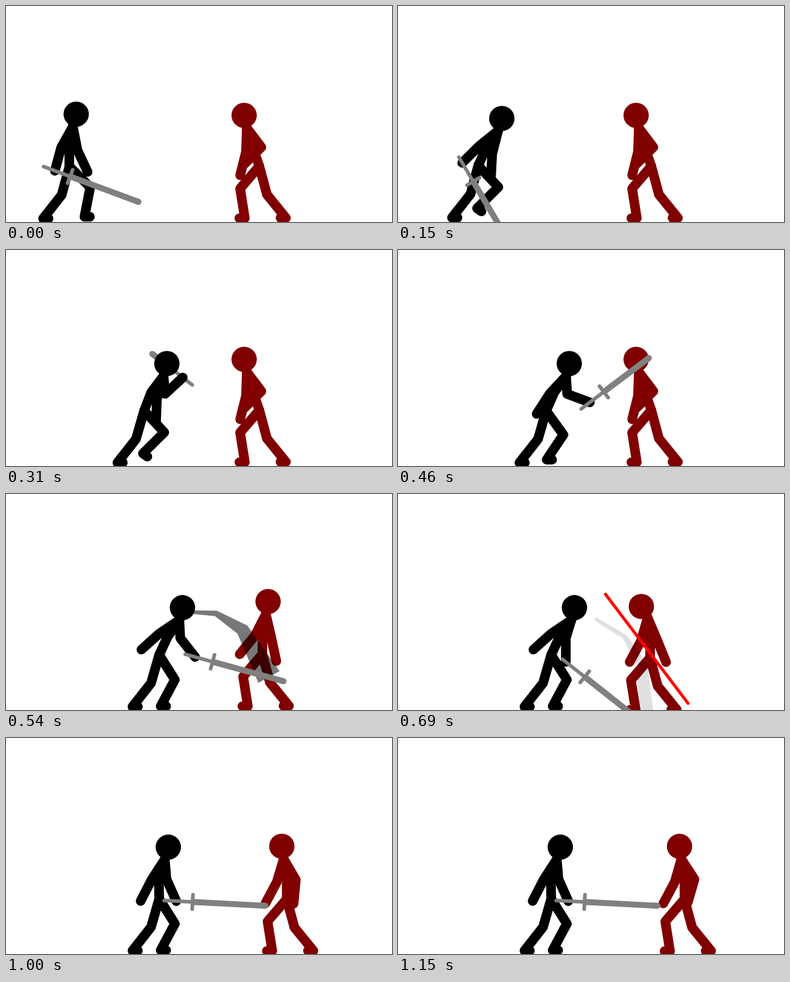
An HTML page with a canvas that plays this animation: 640x360 px, repeating every 1.22 s.

```html
<!DOCTYPE html>
<html lang="en">
<head>
<meta charset="utf-8">
<title>Sword fight</title>
<style>
  html, body { margin: 0; width: 100%; height: 100%; overflow: hidden; background: #fff; }
  canvas { display: block; width: 640px; height: 360px; }
</style>
</head>
<body>
<canvas id="stage" width="640" height="360"></canvas>
<script>
const ctx = document.getElementById('stage').getContext('2d');
const LOOP = 1220, FPS = 13, STEPS = 16;
const SPINE = 33.5, NECK = 21.5, HEAD = 21, ARM = 40, THIGH = 49, SHIN = 50, FOOT = 9, GRIP = 47;
const GREY = '#808080';

// Limbs hang: 0 degrees is down, positive swings right.
// spine: waist, chest and head lean; sword: angle, grip offset, length; reach: sword upper arm
const swordsman = {
  walk: { hip: [105, 267.5], spine: [0, 10, 15], armA: [-29, -15], armB: [11, 25],
    legA: [-15, -38], legB: [45, -11], reach: [40], sword: [20.5, 20, 168] },
  stoop: { hip: [133, 266], spine: [24, 35, 17], armA: [-51, -45], armB: [-14, -3],
    legA: [-15, -38], legB: [43, -45], reach: [40], sword: [59.5, 11, 168] },
  raise: { hip: [229, 268], spine: [21, 37, 15], armA: [5, 133], armB: [-16, -2],
    legA: [-16, -38], legB: [43, -45], reach: [30], sword: [-142, 20, 84] },
  strike: { hip: [254, 268], spine: [25, 35, 14], armA: [3, 38], armB: [-56, -48],
    legA: [-16, -38], legB: [32, -28], reach: [30], sword: [15.4, 17, 169] }
};
swordsman.follow = { ...swordsman.strike, armA: [-17, 0], reach: [31], sword: [38.5, 7, 169] };
swordsman.guard = { ...swordsman.strike, spine: [-1, 17, 16], armA: [5, 24], armB: [-33, -27],
  reach: [33], sword: [3, 20, 168] };

const stance = { legA: [-40.5, 9], legB: [15, 39], reach: [ARM] };
const rival = {
  wait: { ...stance, hip: [420, 267], spine: [-19, -17, -12], armA: [-2, -14], armB: [37, -45] },
  hit: { ...stance, hip: [425, 267], spine: [1, 9, 10], armA: [-27, -39], armB: [13, 12] },
  bend: { ...stance, hip: [418, 273], spine: [0, -7, -29], armA: [-16, -28], armB: [23, 22] },
  rise: { ...stance, hip: [441, 268], spine: [0, -8, -9], armA: [-18, -28], armB: [23, 22] },
  retreat: { ...stance, hip: [475, 268.5], spine: [0, -9, -8], armA: [-16, -28], armB: [33, -16] }
};

const mix = (a, b, k) => a.map((v, i) => v + (b[i] - v) * k);
const blend = (a, b, k) =>
  Object.fromEntries(Object.keys(a).map(key => [key, mix(a[key], b[key], k)]));

// Key poses by step number; the steps between them are blended
const S = swordsman, R = rival;
const backing = blend(R.rise, R.retreat, .72);
const manKeys = [[0, S.walk], [2, S.stoop], [4, S.raise], [7, S.strike], [9, S.follow],
  [11, S.follow], [13, S.guard], [15, S.guard]];
const foeKeys = [[0, R.wait], [6, R.wait], [7, R.hit], [9, R.bend], [11, R.rise],
  [13, backing], [14, backing], [15, R.retreat]];

function poseAt(keys, step) {
  const next = keys.findIndex(([at]) => at >= step);
  const [t1, b] = keys[next], [t0, a] = keys[Math.max(0, next - 1)];
  return blend(a, b, t1 > t0 ? (step - t0) / (t1 - t0) : 0);
}

const rad = deg => deg * Math.PI / 180;
const hang = ([x, y], deg, len) => [x + Math.sin(rad(deg)) * len, y + Math.cos(rad(deg)) * len];
const rise = (p, lean, len) => hang(p, 180 - lean, len);

function line(color, width, ...points) {
  ctx.strokeStyle = color;
  ctx.lineWidth = width;
  ctx.beginPath();
  points.forEach(p => ctx.lineTo(...p));
  ctx.stroke();
}

function neckOf({ hip, spine }) {
  const waist = rise(hip, spine[0], SPINE);
  return [waist, rise(waist, spine[1], SPINE)];
}

function limb(from, [upper, lower], upperLen, lowerLen) {
  const joint = hang(from, upper, upperLen);
  return [from, joint, hang(joint, lower, lowerLen)];
}

function swordArm(pose) {
  return limb(neckOf(pose)[1], pose.armA, pose.reach[0], ARM);
}

function figure(pose, color, facing) {
  const [waist, neck] = neckOf(pose);
  const head = rise(neck, pose.spine[2], NECK);
  line(color, 16, pose.hip, waist, neck, head);
  line(color, 16, ...swordArm(pose));
  line(color, 16, ...limb(neck, pose.armB, ARM, ARM));
  for (const angles of [pose.legA, pose.legB]) {
    const leg = limb(pose.hip, angles, THIGH, SHIN);
    const lift = Math.max(0, 349 - leg[2][1]);
    const toe = hang(leg[2], facing * (90 - Math.min(35, lift * 4)), FOOT);
    line(color, 16, ...leg, toe);
  }
  ctx.fillStyle = color;
  ctx.beginPath();
  ctx.arc(...head, HEAD, 0, Math.PI * 2);
  ctx.fill();
}

function drawSword(pose) {
  const [angle, hold, length] = pose.sword;
  ctx.save();
  ctx.translate(...swordArm(pose)[2]);
  ctx.rotate(rad(angle));
  ctx.translate(-hold, 0);
  line(GREY, 6, [0, 0], [GRIP, 0]);
  line(GREY, 6, [GRIP, -12], [GRIP, 12]);
  ctx.lineCap = 'butt';
  line(GREY, 10, [GRIP, 0], [length, 0]);
  ctx.lineCap = 'round';
  line(GREY, 10, [length - 6, 0], [length, 0]);
  ctx.restore();
}

// Ribbon that widens along its path as the swing fades
function drawTrail(k) {
  const high = [[310, 197], [348, 199], [392, 226], [436, 305]];
  const low = [[327, 208], [376, 238], [406, 285], [410, 362]];
  const path = high.map((p, i) => mix(p, low[i], k));
  const outer = [], inner = [];
  path.forEach(([x, y], i) => {
    const a = path[Math.max(0, i - 1)], b = path[Math.min(3, i + 1)];
    const dir = Math.atan2(b[1] - a[1], b[0] - a[0]);
    const half = 3 + (1.9 - .75 * k) * i * i;
    const dx = Math.sin(dir) * half, dy = -Math.cos(dir) * half;
    outer.push([x + dx, y + dy]);
    inner.unshift([x - dx, y - dy]);
  });
  ctx.fillStyle = `rgba(0, 0, 0, ${.53 - .41 * k})`;
  ctx.beginPath();
  [...outer, ...inner].forEach(p => ctx.lineTo(...p));
  ctx.fill();
}

function draw(step) {
  const man = poseAt(manKeys, step), foe = poseAt(foeKeys, step);
  const behind = man.sword[0] < -60;
  ctx.fillStyle = '#fff';
  ctx.fillRect(0, 0, 640, 360);
  ctx.lineCap = ctx.lineJoin = 'round';
  figure(foe, '#800000', -1);
  if (step >= 7 && step <= 9) drawTrail((step - 7) / 2);
  if (behind) drawSword(man);
  figure(man, '#000', 1);
  if (!behind) drawSword(man);
  if (step === 9) line('#f00', 5, [344, 167], [481, 349]);
}

// Steps begin on whole hundredths of a second
const stepStart = i => Math.round(i * 100 / FPS) * 10;

const start = performance.now();
function tick() {
  const t = (performance.now() - start) % LOOP;
  let step = STEPS - 1;
  while (stepStart(step) > t) step--;
  draw(step);
  requestAnimationFrame(tick);
}
tick();
</script>
</body>
</html>
```
